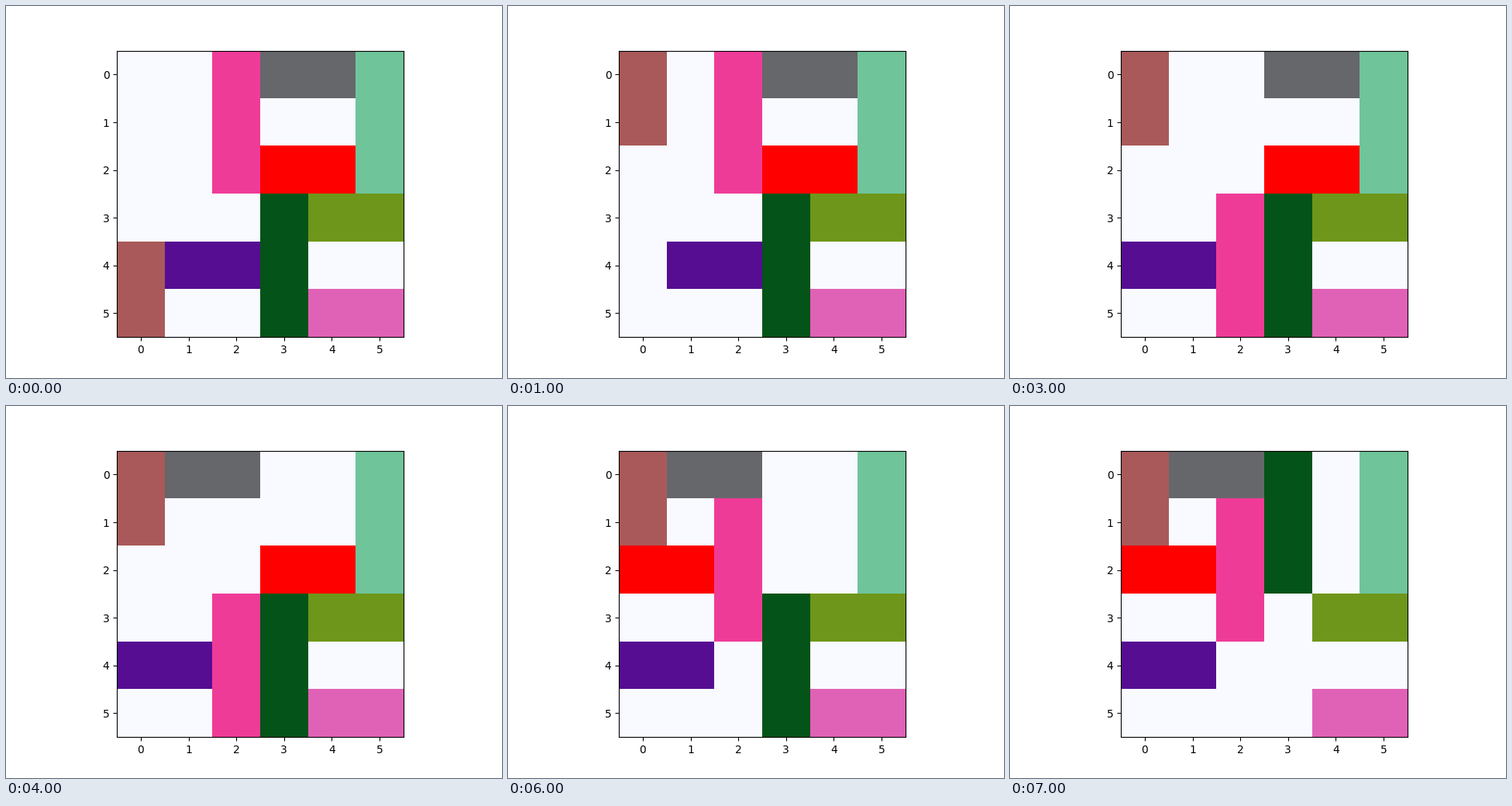
Write a matplotlib script that moves like this. It is 640 px wide and 480 px high and loops after 8000 ms.

```python
import matplotlib.pyplot as plt
import numpy as np
from matplotlib.animation import FuncAnimation
from matplotlib.colors import to_rgb

SIZE = 6
FLOOR = "#f8faff"

# name: (colour, row, column, height, width)
CARS = {
    "brown": ("#a95959", 4, 0, 2, 1),
    "purple": ("#560d92", 4, 1, 1, 2),
    "pink": ("#ef3b98", 0, 2, 3, 1),
    "grey": ("#66676b", 0, 3, 1, 2),
    "red": ("#ff0000", 2, 3, 1, 2),
    "mint": ("#6fc49a", 0, 5, 3, 1),
    "green": ("#045318", 3, 3, 3, 1),
    "olive": ("#6e961a", 3, 4, 1, 2),
    "orchid": ("#df62b6", 5, 4, 1, 2),
}

# One slide per step: name, rows, columns
MOVES = [
    ("brown", -4, 0),
    ("purple", 0, -1),
    ("pink", 3, 0),
    ("grey", 0, -2),
    ("red", 0, -3),
    ("pink", -2, 0),
    ("green", -3, 0),
]


def board(step):
    grid = np.full((SIZE, SIZE, 3), to_rgb(FLOOR))
    for name, (color, row, col, height, width) in CARS.items():
        for mover, down, right in MOVES[:step]:
            if mover == name:
                row += down
                col += right
        grid[row:row + height, col:col + width] = to_rgb(color)
    return grid


fig, ax = plt.subplots(figsize=(6.4, 4.8), dpi=100)
image = ax.imshow(board(0))
ax.set_xticks(range(SIZE))
ax.set_yticks(range(SIZE))


def update(step):
    image.set_data(board(step))
    return [image]


anim = FuncAnimation(fig, update, frames=len(MOVES) + 1, interval=1000,
                     repeat=True, repeat_delay=0)
plt.show()
```
